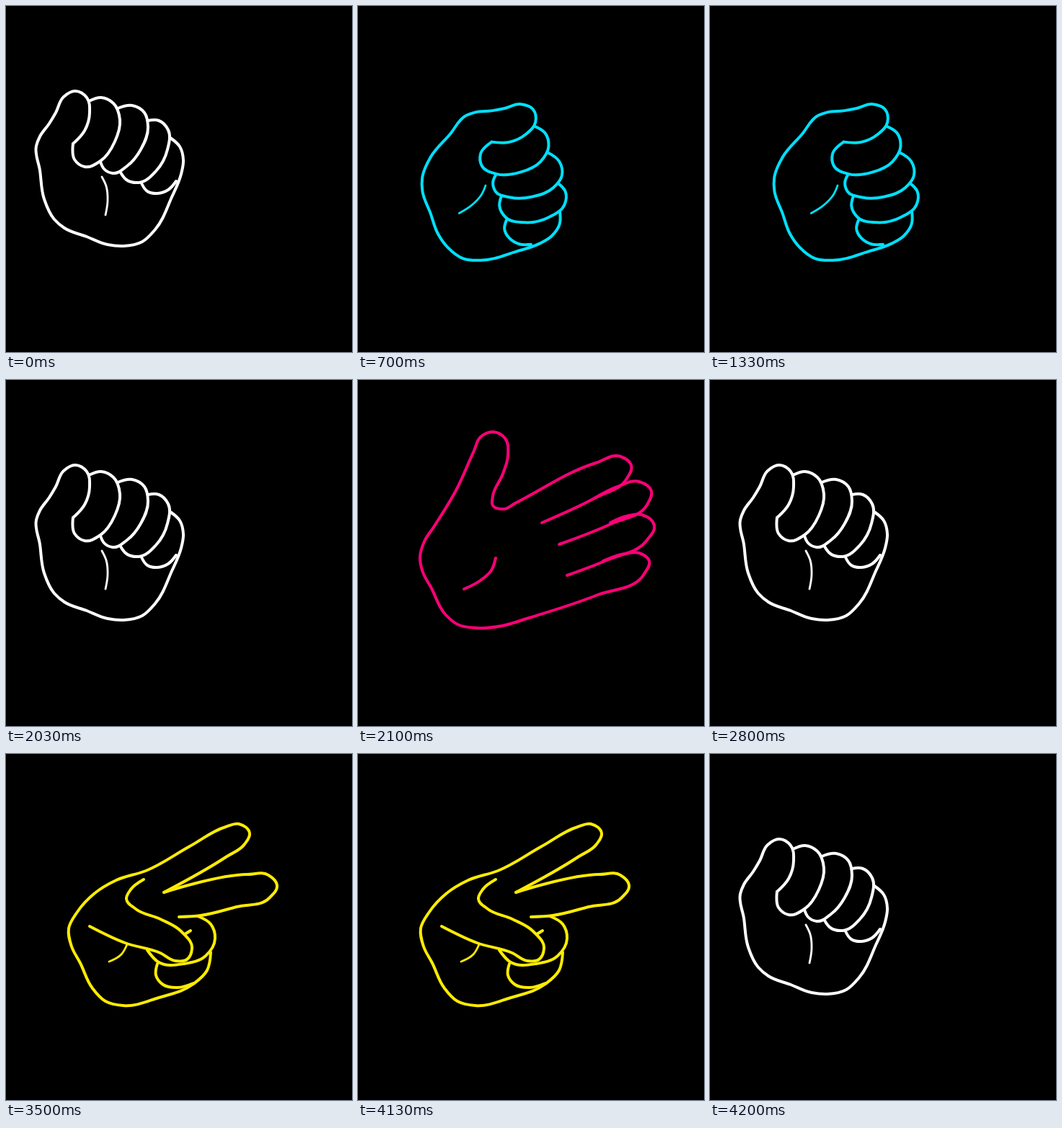
Animation, 480 px wide and 480 px high, one loop 4270 ms. Source, as an HTML page with a canvas:

```html
<!DOCTYPE html>
<html>
<head>
<meta charset="utf-8">
<style>
  html, body { margin: 0; height: 100%; overflow: hidden; background: #000; }
  canvas { display: block; width: 100%; height: 100%; }
</style>
</head>
<body>
<canvas width="480" height="480"></canvas>
<script>
  const ctx = document.querySelector("canvas").getContext("2d");
  const LOOP = 4270, STEP = 700;

  // Smooth curve through points written as "x,y x,y ...".
  function stroke(points, width = 4) {
    const p = points.split(" ").map(pair => pair.split(",").map(Number));
    const gap = i => Math.hypot(p[i + 1][0] - p[i][0], p[i + 1][1] - p[i][1]);
    const tangent = i => {
      if (i === 0 || i === p.length - 1) return [0, 0];
      const before = gap(i - 1), after = gap(i);
      const [x, y] = [0, 1].map(k =>
        (p[i][k] - p[i - 1][k]) * after / before + (p[i + 1][k] - p[i][k]) * before / after);
      const size = Math.hypot(x, y) || 1;
      return [x / size, y / size];
    };
    const path = new Path2D();
    path.moveTo(...p[0]);
    for (let i = 0; i < p.length - 1; i++) {
      const reach = gap(i) * 0.35, a = tangent(i), b = tangent(i + 1), [x, y] = p[i + 1];
      path.bezierCurveTo(p[i][0] + a[0] * reach, p[i][1] + a[1] * reach,
        x - b[0] * reach, y - b[1] * reach, x, y);
    }
    return { path, width };
  }

  const fist = [
    stroke("93,191 109,173 116,148 112,127 96,118 80,126 69,148 60,163 47,181 42,194 47,228 53,268 67,296 81,308 112,320 141,331 163,333 189,327 207,310 230,265 243,233 246,214 241,195 228,183"),
    stroke("115,132 132,127 149,135 158,158 151,188 131,215 109,223 95,213 93,191"),
    stroke("155,142 175,138 192,148 197,168 187,199 168,222 148,232 136,226 131,216"),
    stroke("197,159 212,159 225,172 224,199 208,229 184,245 167,241 159,231"),
    stroke("188,246 196,257 210,260 225,255 236,243"),
    stroke("133,237 139,250 141,270 138,290", 2.8)
  ];

  const paper = [
    stroke("340,251 370,241 390,240 404,251 397,269 330,299 237,330 200,341 165,344 138,339 121,325 102,289 89,264 86,246 92,224 105,204 136,153 161,98 170,79 188,72 204,81 208,105 201,130 187,161 187,174 202,179 218,171 330,115 364,106 379,118 372,138 330,163 255,198"),
    stroke("328,164 360,148 390,141 407,154 401,173 350,200 279,228"),
    stroke("350,198 372,189 394,187 411,202 401,222 345,250 290,271"),
    stroke("191,247 185,264 170,278 147,290")
  ];

  const scissors = [
    stroke("219,192 305,143 331,125 338,110 323,97 305,101 255,128 194,162 153,175 122,194 99,219 87,242 91,267 103,290 120,325 138,343 163,349 212,338 260,319 279,300 284,275"),
    stroke("219,192 335,167 364,168 376,182 365,200 320,212 270,224 240,226"),
    stroke("191,174 173,188 167,201 180,215 214,229 243,246 258,270 251,285 235,287 214,276 165,262 116,239"),
    stroke("266,225 284,236 290,256 277,280 247,291 212,289 196,272"),
    stroke("248,250 256,245"),
    stroke("210,291 208,307 218,320 238,324 260,318"),
    stroke("168,264 160,278 143,288", 2.8)
  ];

  const ready = { hand: fist, color: "#fff" };
  const throws = [
    { hand: fist, color: "#00e0ff", turned: true },
    { hand: paper, color: "#ff0078" },
    { hand: scissors, color: "#ffec00" }
  ];

  function render(time) {
    const step = Math.floor(time % LOOP / STEP);
    const { hand, color, turned } = step % 2 ? throws[(step - 1) / 2] : ready;
    ctx.fillStyle = "#000";
    ctx.fillRect(0, 0, 480, 480);
    ctx.save();
    if (turned) {
      ctx.translate(177, 249);
      ctx.rotate(49 * Math.PI / 180);
      ctx.translate(-133, -237);
    }
    ctx.strokeStyle = color;
    ctx.lineCap = ctx.lineJoin = "round";
    for (const { path, width } of hand) {
      ctx.lineWidth = width;
      ctx.stroke(path);
    }
    ctx.restore();
  }

  const start = performance.now();
  function tick() {
    render(performance.now() - start);
    requestAnimationFrame(tick);
  }
  tick();
</script>
</body>
</html>
```
